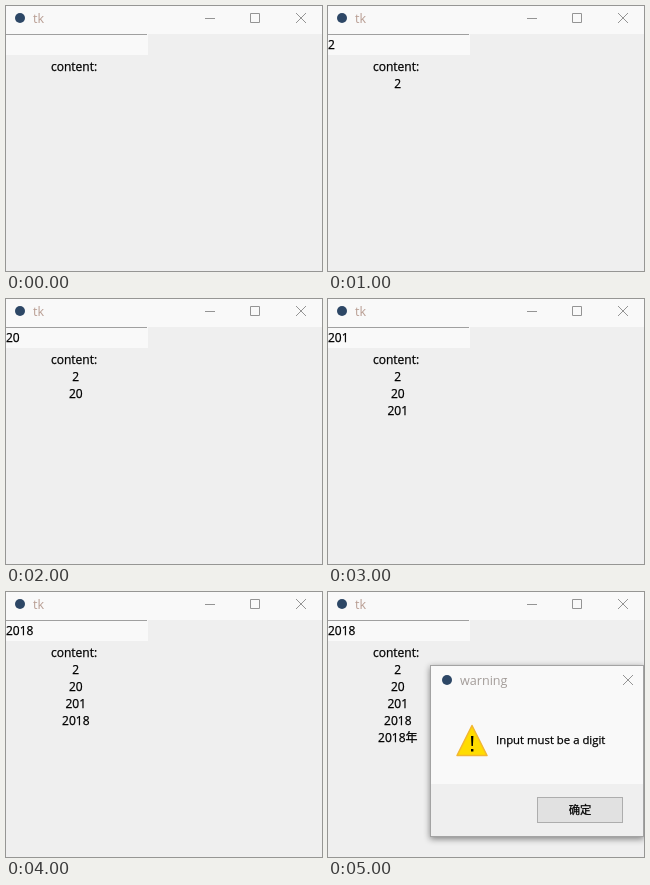
Animation of 316 by 265 pixels, one loop 6 s. Source, as an HTML page:

```html
<!DOCTYPE html>
<html lang="en">
<head>
<meta charset="utf-8">
<title>Digit entry</title>
<style>
  html, body { margin: 0; width: 100%; height: 100%; overflow: hidden; background: #efefef; }
  svg { display: block; }
  text {
    font: 12px "Open Sans", "Noto Sans CJK SC", "Noto Sans CJK", sans-serif;
    white-space: pre;
    stroke: #000;
    stroke-width: .25px;
  }
  .title { font-size: 12.6px; fill: #a39c99; stroke: none; }
  .message { font-size: 11.35px; }
  .middle { text-anchor: middle; }
  .control { fill: none; stroke: #949494; }
  .shadow { filter: drop-shadow(0 2px 3px #0007); }
</style>
</head>
<body>
<svg width="316" height="265" viewBox="0 0 316 265">
  <defs>
    <path id="close" class="control" d="M0 0l10 10M10 0l-10 10"/>
    <circle id="icon" r="5" fill="#2d4766"/>
  </defs>

  <rect width="316" height="265" fill="#efefef"/>
  <rect width="316" height="28" fill="#f9f9f9"/>
  <use href="#icon" x="14" y="12"/>
  <text class="title" x="27" y="17" style="fill:#b89d92">tk</text>
  <path class="control" d="M199 12.5h10M244.5 7.5h9v9h-9z"/>
  <use href="#close" x="290" y="7"/>

  <rect y="28" width="142" height="21" fill="#f9f9f9"/>
  <path d="M0 28.5h141" stroke="#a0a0a0"/>
  <text id="entry" x="0" y="43"></text>
  <text x="45" y="65">content:</text>
  <g id="log"></g>

  <g id="dialog">
    <rect class="shadow" x="102" y="73" width="214" height="172" fill="#a3a3a3"/>
    <rect x="103" y="74" width="212" height="118" fill="#f9f9f9"/>
    <rect x="103" y="192" width="212" height="52" fill="#efefef"/>
    <use href="#icon" x="119" y="88"/>
    <text class="title" x="132" y="93">warning</text>
    <use href="#close" x="295" y="83"/>
    <path d="M144 133.5L159 163.5H129z" fill="#ffdc00" stroke="#f2b632" stroke-width="1.5" stroke-linejoin="round"/>
    <path d="M143 144h2.4l-.5 10h-1.4zM143 157h2.4v2.5h-2.4z"/>
    <text class="message" x="168" y="152">Input must be a digit</text>
    <rect x="209.5" y="205.5" width="85" height="25" fill="#e1e1e1" stroke="#adadad"/>
    <text class="message middle" x="252" y="222">确定</text>
  </g>
</svg>
<script>
const STEP = 1000;
const ACCEPTED = "2018";
const inputs = ["2", "20", "201", "2018", "2018年"];
const find = id => document.getElementById(id);
const entry = find("entry"), log = find("log"), dialog = find("dialog");

const lines = inputs.map((value, i) => {
  const line = document.createElementNS("http://www.w3.org/2000/svg", "text");
  line.setAttribute("class", "middle");
  line.setAttribute("x", 69.8);
  line.setAttribute("y", 82 + 17 * i);
  line.textContent = value;
  return log.appendChild(line);
});

function show(element, visible) {
  element.style.display = visible ? "" : "none";
}

function draw(time) {
  const count = Math.floor(time / STEP) % (inputs.length + 1);
  entry.textContent = ACCEPTED.slice(0, count);
  lines.forEach((line, i) => show(line, i < count));
  show(dialog, count === inputs.length);
}

const start = performance.now();
function tick() {
  draw(performance.now() - start);
  requestAnimationFrame(tick);
}
tick();
</script>
</body>
</html>
```
